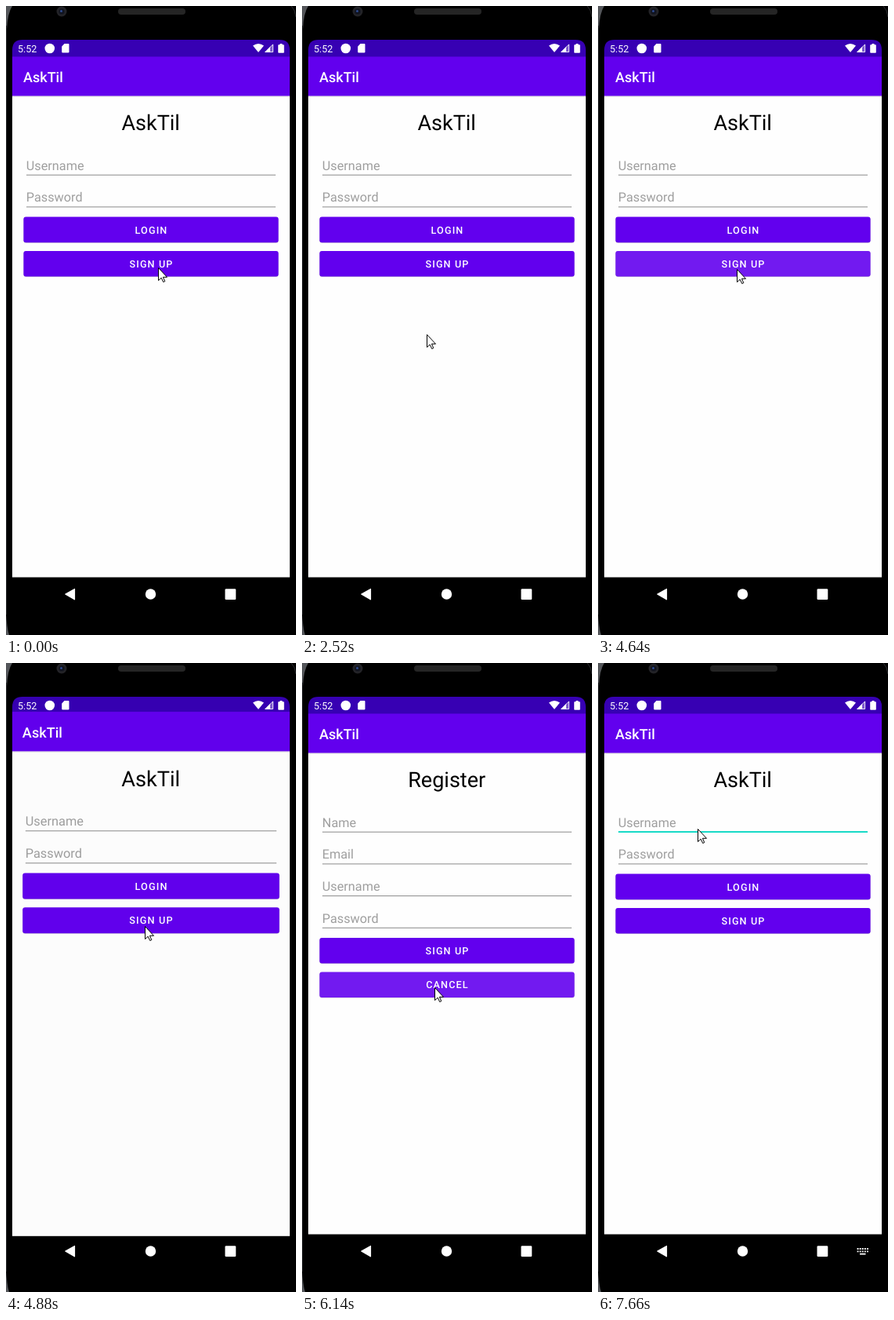
An HTML page for the animation above (8 s loop, 370 by 801 pixels).

```html
<!DOCTYPE html>
<html lang="en">
<head>
<meta charset="utf-8">
<title>Sign-in screens</title>
<style>
  html, body { margin: 0; height: 100%; overflow: hidden; background: #000; }
  svg { display: block; width: 370px; height: 801px; font-family: Roboto, sans-serif; text-rendering: geometricPrecision; }
  .bar { font-size: 18px; font-weight: 500; fill: #fff; }
  .title { font-size: 27px; text-anchor: middle; }
  .hint { font-size: 16.25px; fill: #9f9f9f; }
  .label { font-size: 12.62px; font-weight: 500; letter-spacing: 1.126px; text-anchor: middle; fill: #fff; }
</style>
</head>
<body>
<svg viewBox="0 0 370 801">
  <clipPath id="screen"><path d="M8 771V56q0-13 13-13H349q13 0 13 13V771z"/></clipPath>
  <rect width="370" height="801"/>

  <!-- phone body -->
  <path d="M0 0H8Q2 9 1 30H0zM0 772Q1 792 4 801H0z" fill="#54565a"/>
  <path d="M.5 25V775M364 0Q369 5 370 14" fill="none" stroke="#2c2d30"/>
  <circle cx="71" cy="7" r="6.5" fill="#232327"/>
  <circle cx="71" cy="7" r="3.6" fill="#10131f"/>
  <circle cx="70.5" cy="6.5" r="1.5" fill="#2d4a8e"/>
  <rect x="143" y="3" width="86" height="8" rx="4" fill="#252525"/>

  <g id="windows" clip-path="url(#screen)"></g>

  <!-- system icons -->
  <g fill="#fff">
    <text x="15" y="58.5" font-size="12.62">5:52</text>
    <circle cx="55.8" cy="54" r="6.3"/>
    <path d="M74.5 48H79.5q1 0 1 1V58.5q0 1-1 1H72.2q-1 0-1-1V51.5z"/>
    <path d="M315 50.5Q322 45.5 329 50.5L322 59z"/>
    <path d="M330 59L337 52V59z"/>
    <path d="M330.9 58.6L340.6 48.9V58.6z" fill-opacity=".35" stroke="#fff" stroke-width=".9"/>
    <path d="M349.5 48H352.500V49.3H354q.8 0 .8.8V59q0 .8-.8.8H348q-.8 0-.8-.8V50.1q0-.8.8-.8H349.5z"/>
    <path d="M75.8 749L87.500 742.5V755.800z" stroke="#fff" stroke-width="1.2" stroke-linejoin="round"/>
    <circle cx="184.5" cy="749" r="6.7"/>
    <rect x="279.5" y="742.2" width="13.8" height="13.8" rx="1.3"/>
    <g id="keyboard" fill="none" stroke="#fff" stroke-width="1.8">
      <path d="M330.6 746H345M330.6 749.3H345" stroke-dasharray="1.9 1.2"/>
      <path d="M334 752.6H341.5"/>
    </g>
  </g>

  <path id="cursor" d="M.5.5V16.6L4.2 13.2 6.7 18.500 8.800 17.600 6.400 12.300H11.500z" fill="#fff" stroke="#000" stroke-linejoin="round"/>
</svg>

<script>
const $ = id => document.getElementById(id);
const NAME = 'AskTil', LOOP = 8000, FRAME = 120;
const SIGN_UP = 4640, CANCEL = 6020, FOCUS = 7140;

// Pointer moves: start, end, x, y reached; it rests in between
const moves = [
  [0, 300, 186, 333], [1400, 1520, 181, 353], [1520, 1880, 151, 450], [2000, 2250, 151, 439],
  [2250, 3120, 179, 364], [3120, 3510, 179, 353], [3510, 3810, 179, 335], [4000, 4240, 177, 335],
  [5140, 5270, 177, 343], [5270, 5720, 169, 413], [6380, 6680, 134, 219], [6680, 6830, 127, 211]
];

const clamp = k => Math.min(1, Math.max(0, k));
const smooth = k => k * k * (3 - 2 * k);

function pointer(t) {
  let x = 194, y = 333;
  for (const [start, end, toX, toY] of moves) {
    const n = Math.round((end - start) / 130);
    const k = Math.floor(clamp((t - start) / (end - start)) * n) / n;
    x += (toX - x) * k;
    y += (toY - y) * k;
  }
  return [Math.round(x), Math.round(y)];
}

const rect = (x, y, w, h, fill, more = '') =>
  `<rect x="${x}" y="${y}" width="${w}" height="${h}" fill="${fill}" ${more}/>`;
const text = (cls, x, y, s) => `<text class="${cls}" x="${x}" y="${y}">${s}</text>`;

function field(hint, i) {
  const y = 40.7 * i;
  return text('hint', 25.8, 208.7 + y, hint) + rect(26, 214.7 + y, 318, 1, '#8b8b8b');
}

function button(label, y) {
  const box = (dy, fill, more) => rect(22.4, y + dy, 325.2, 32.6, fill, 'rx="3" ' + more);
  return box(.5, '#000', 'opacity=".2"') + box(0, '#6200ee') +
    box(0, '#fff', 'class="press"') + text('label', 185.5, y + 21, label);
}

function makeWindow(title, fields, buttons) {
  const top = 187.2 + 40.7 * fields.length;
  const g = document.createElementNS('http://www.w3.org/2000/svg', 'g');
  g.innerHTML = rect(8, 43, 354, 22, '#3700b3') + rect(8, 114, 354, 614, '#fefefe') +
    rect(8, 114, 354, 2, '#e8e8e8') + rect(8, 64.5, 354, 50, '#6200ee') +
    rect(8, 727.5, 354, 44, '#000') +
    text('bar', 22, 97, NAME) + text('title', 184.7, 158.3, title) +
    fields.map(field).join('') +
    buttons.map((s, i) => button(s, top + 43.4 * i)).join('');
  g.press = g.querySelectorAll('.press');
  g.press.forEach(e => e.setAttribute('opacity', 0));
  return g;
}

const login = makeWindow(NAME, ['Username', 'Password'], ['LOGIN', 'SIGN UP']);
const register = makeWindow('Register', ['Name', 'Email', 'Username', 'Password'], ['SIGN UP', 'CANCEL']);
login.insertAdjacentHTML('beforeend', '<g id="focus">' + rect(26, 214.2, 318, 1.8, '#03dac5') +
  rect(25.7, 191, 1.7, 21, '#03dac5', 'id="caret"') + '</g>');
$('windows').append(login, register);

function place(g, scale, opacity) {
  g.setAttribute('transform', `translate(185 406) scale(${scale}) translate(-185 -406)`);
  g.setAttribute('opacity', opacity);
}

const show = (id, on) => $(id).setAttribute('visibility', on ? 'visible' : 'hidden');

function render(t) {
  const back = t >= CANCEL;
  const [from, to] = back ? [register, login] : [login, register];
  // Time since the tap, in whole frames
  const since = Math.floor((t - (back ? CANCEL : SIGN_UP)) / FRAME) * FRAME;
  const p = smooth(clamp((since - 187) / 222));

  $('windows').append(from, to);
  place(from, 1 + .05 * p, 1 - .3 * p * p);
  place(to, .85 + .15 * p, p > .5 ? 1 : 0);
  from.press[1].setAttribute('opacity', since >= 0 && since < 2 * FRAME ? .1 : 0);
  to.press[1].setAttribute('opacity', 0);

  show('focus', t >= FOCUS);
  show('caret', t >= FOCUS && t < FOCUS + 500);
  show('keyboard', t >= FOCUS + FRAME);
  $('cursor').setAttribute('transform', `translate(${pointer(t)})`);
}

const begin = performance.now();
function tick() {
  render(Math.max(0, performance.now() - begin) % LOOP);
  requestAnimationFrame(tick);
}
tick();
</script>
</body>
</html>
```
